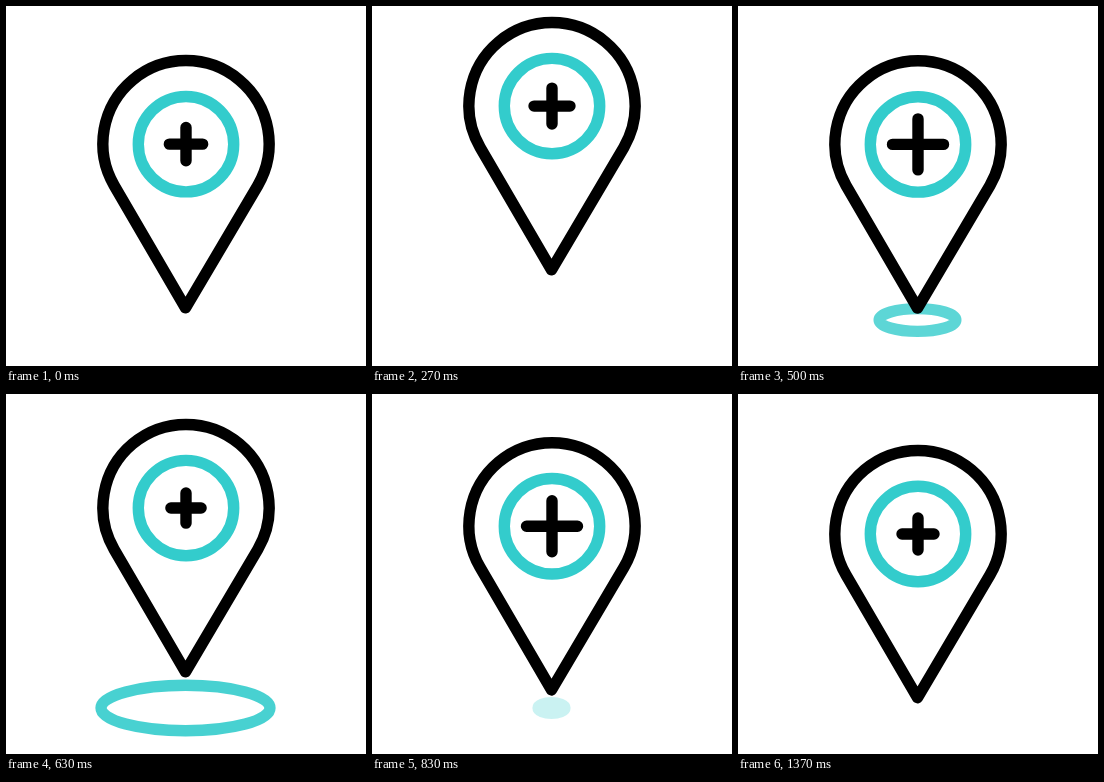
Recreate the animation shown at these times as an HTML page. Size 360x360 px, loop 1.67 s.

```html
<!DOCTYPE html>
<html lang="en">
<head>
<meta charset="utf-8">
<title>Map pin</title>
<style>
  html, body { margin: 0; width: 100%; height: 100%; overflow: hidden; background: #fff; }
  svg { display: block; width: 100vw; height: 100vh; }
</style>
</head>
<body>
<svg viewBox="0 0 360 360" fill="none" stroke="#000" stroke-width="11.4" stroke-linecap="round" stroke-linejoin="round">
  <ellipse id="ripple" cx="179.5" cy="314" stroke="#33cccc"/>
  <g id="pin">
    <path d="M179.5 303.7L108.1 181.2A83.1 83.1 0 1 1 251.9 181.2Z"/>
    <circle cx="180" cy="140" r="47.7" stroke="#33cccc"/>
    <path id="plus"/>
  </g>
</svg>
<script>
const LOOP = 1670, STEPS = 50;
const [ripple, pin, plus] = ["ripple", "pin", "plus"].map(id => document.getElementById(id));

// [step, value] keys, eased between neighbours
const hop = [[-1.2, 0], [7.5, -40.5], [14, 0], [20.8, -31], [27.1, 0]];
const arm = [[-1, 16], [5, 25.5], [10, 14], [15, 25.5], [20, 14], [25, 25.5], [30, 14], [35, 16]];

function tween(keys, step) {
  const next = keys.findIndex(([at]) => at > step);
  if (next < 0) return keys[keys.length - 1][1];
  const [t0, a] = keys[next - 1], [t1, b] = keys[next];
  return a + (b - a) * (1 - Math.cos(Math.PI * (step - t0) / (t1 - t0))) / 2;
}

function drawRipple(step) {
  const [start, end] = step < 24.5 ? [12.6, 25.3] : [24, 40.2];
  const p = Math.min(1, Math.max(0, (step - start) / (end - start)));
  const rx = 112 * (1 - (1 - p) ** 2);
  ripple.setAttribute("rx", rx);
  ripple.setAttribute("ry", 2 + rx * 0.245);
  ripple.setAttribute("opacity", Math.min(1, p * 4.2, (1 - p) * 1.8));
}

function draw(now) {
  const step = Math.min(STEPS - 1, Math.floor((now % LOOP + 5) / LOOP * STEPS));
  const a = tween(arm, step);
  pin.setAttribute("transform", `translate(0 ${tween(hop, step)})`);
  plus.setAttribute("d", `M${180 - a} 140H${180 + a}M180 ${140 - a}V${140 + a}`);
  drawRipple(step);
}

const begin = performance.now();
function tick() {
  draw(performance.now() - begin);
  requestAnimationFrame(tick);
}
tick();
</script>
</body>
</html>
```
